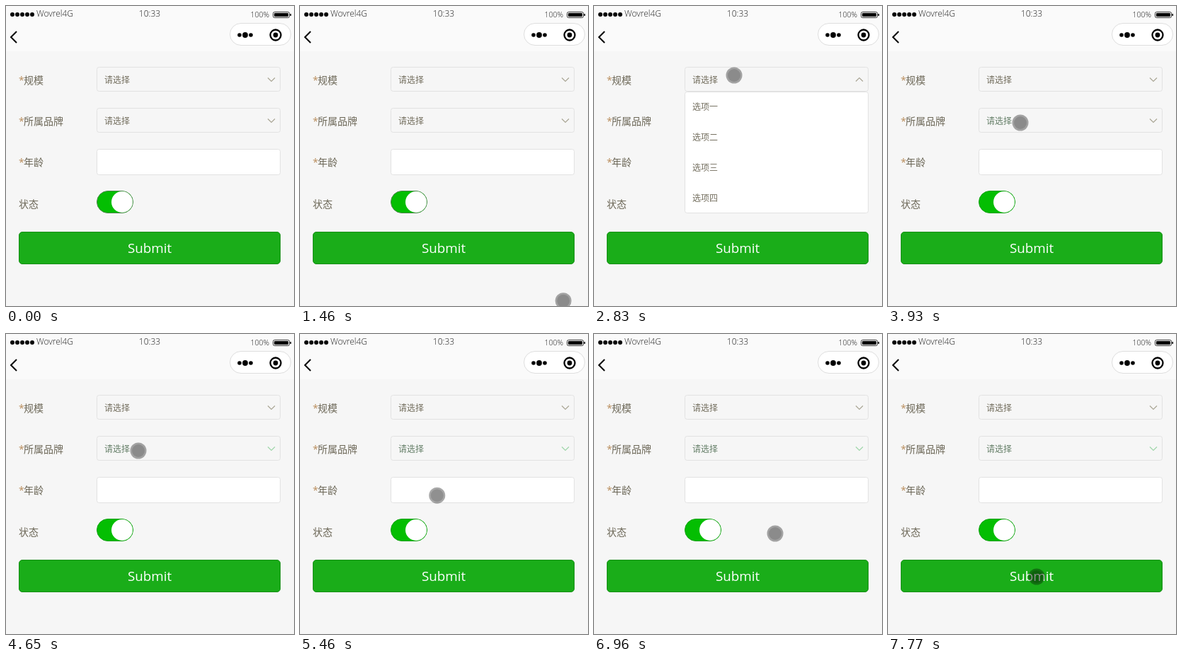
An HTML page for the animation above (8 s loop, 407 by 424 pixels).

```html
<!DOCTYPE html>
<html lang="zh">
<head>
<meta charset="utf-8">
<title>Form</title>
<style>
  html, body { margin: 0; width: 100%; height: 100%; overflow: hidden; background: #f6f6f6; }
  svg { display: block; }
  text { font-family: "Open Sans", "Noto Sans CJK SC", "Noto Sans CJK", sans-serif; }
  .label { font-size: 14px; fill: #6c6757; }
  .star { fill: #b98d5c; }
  .hint { font-size: 12px; fill: #757060; }
  .field { fill: #f6f6f6; stroke: #e2e2e2; }
  .arrow { fill: none; stroke: #aaa695; stroke-width: 1.2; }
  .status { fill: #222; font-weight: 300; }
</style>
</head>
<body>
<svg width="407" height="424" viewBox="0 0 407 424">
  <rect width="407" height="424" fill="#f6f6f6"/>
  <rect width="407" height="64" fill="#fafafa"/>

  <path d="M9 12h28.1" stroke="#000" stroke-width="6" stroke-linecap="round" stroke-dasharray="0 7"/>
  <g class="status">
    <text x="43" y="15" font-size="12">Wovrel4G</text>
    <text x="203" y="15" font-size="12" text-anchor="middle">10:33</text>
    <text x="372" y="16" font-size="10.5" text-anchor="end">100%</text>
  </g>
  <rect x="377.5" y="8.5" width="23" height="8" rx="2" fill="none" stroke="#333"/>
  <rect x="379" y="10" width="20" height="5" rx="1"/>
  <rect x="401.5" y="11" width="1.5" height="3"/>

  <path d="M15 36l-8 8 8 8" fill="none" stroke="#000" stroke-width="2"/>
  <rect x="316.5" y="24.5" width="86" height="31" rx="15.5" fill="#fff" stroke="#dedede"/>
  <circle cx="330" cy="41" r="2.8"/>
  <circle cx="338" cy="41" r="3.9"/>
  <circle cx="346" cy="41" r="2.8"/>
  <circle cx="381" cy="41" r="7.5" fill="none" stroke="#000" stroke-width="2.3"/>
  <circle cx="381" cy="41" r="3.4"/>

  <text class="label" x="18" y="110"><tspan class="star">*</tspan><tspan x="25">规模</tspan></text>
  <text class="label" x="18" y="168"><tspan class="star">*</tspan><tspan x="25">所属品牌</tspan></text>
  <text class="label" x="18" y="226"><tspan class="star">*</tspan><tspan x="25">年龄</tspan></text>
  <text class="label" x="18" y="285">状态</text>

  <g id="selects"></g>

  <rect class="field" x="128.5" y="202.5" width="259" height="36" rx="3" style="fill:#fff"/>
  <path id="caret" d="M139.5 211v18" stroke="#222"/>

  <rect x="128.5" y="261.5" width="51" height="31" rx="15.5" fill="#04be02" id="toggle"/>
  <circle cx="164" cy="277" r="15" fill="#fff"/>

  <rect x="18.5" y="319.5" width="369" height="45" rx="4.5" fill="#1aad19" stroke="#178f17"/>
  <text x="203" y="349" font-size="18.8" fill="#fff" text-anchor="middle">Submit</text>

  <g id="panels"></g>

  <g id="cursor">
    <circle r="11.5" fill-opacity=".34"/>
    <circle r="9" fill-opacity=".14"/>
  </g>
</svg>
<script>
const LOOP = 8000, CLOSE_TIME = 190, ROW = 43;
const byId = id => document.getElementById(id);
const clamp01 = v => Math.max(0, Math.min(1, v));

const selects = [
  { top: 86, open: 2830, close: 3470, rows: 4 },
  { top: 144, open: 4100, close: 4460, rows: 5 },
];

// Each move starts where the previous one ended; px and py are ease-out powers.
const start = { x: 373, y: 418 };
const moves = [
  { from: 1460, to: 2070, x: 198, y: 98, px: 3.05, py: 2.47 },
  { from: 3480, to: 3930, x: 187, y: 165, px: 2, py: 2 },
  { from: 5250, to: 5600, x: 195, y: 240, px: 2, py: 2 },
  { from: 5600, to: 5850, x: 197, y: 225, px: 2, py: 2 },
  { from: 6110, to: 6830, x: 256, y: 282, px: 2, py: 2 },
  { from: 7390, to: 7770, x: 210, y: 343, px: 2, py: 2 },
];

byId('selects').innerHTML = selects.map(({ top }) => `
  <rect class="field" x="128.5" y="${top + .5}" width="259" height="34" rx="3"/>
  <text class="hint" x="139" y="${top + 22.6}">请选择</text>
  <path class="arrow"/>`).join('');

byId('panels').innerHTML = selects.map(({ top, rows }) => {
  const y = top + 35;
  const options = [...'一二三四五'].slice(0, rows).map((n, i) =>
    `<text class="hint" x="139" y="${y + i * ROW + 26}">选项${n}</text>`).join('');
  return `<g><rect x="128.5" y="${y + .5}" width="259" height="${rows * ROW - 1}"
    rx="3" fill="#fff" stroke="#e2e2e2"/>${options}</g>`;
}).join('');

const panels = byId('panels').children;
const arrows = document.querySelectorAll('.arrow');
const hints = document.querySelectorAll('#selects .hint');

function cursorAt(t) {
  let { x, y } = start;
  for (const m of moves) {
    const left = 1 - clamp01((t - m.from) / (m.to - m.from));
    x = m.x + (x - m.x) * left ** m.px;
    y = m.y + (y - m.y) * left ** m.py;
  }
  return { x, y };
}

function draw(t) {
  selects.forEach(({ top, open, close }, i) => {
    const isOpen = t >= open && t < close;
    const opacity = t < open ? 0 : 1 - clamp01((t - close) / CLOSE_TIME);
    panels[i].setAttribute('opacity', opacity);
    arrows[i].setAttribute('d', isOpen
      ? `M370 ${top + 20.5}l5-5 5 5` : `M370 ${top + 15.5}l5 5 5-5`);
  });
  hints[1].style.fill = t < 3470 ? '' : '#67806a';
  arrows[1].style.stroke = t < 4460 ? '' : '#9fd6aa';
  byId('toggle').setAttribute('stroke', t < 3470 ? '#4b854b' : '#10a010');
  byId('caret').setAttribute('opacity', t >= 6050 && t < 6870 ? 1 : 0);

  const { x, y } = cursorAt(t);
  byId('cursor').setAttribute('transform', `translate(${x} ${y})`);
  byId('cursor').setAttribute('opacity', t < 1460 ? 0 : 1);
}

const began = performance.now();
function tick() {
  draw((performance.now() - began) % LOOP);
  requestAnimationFrame(tick);
}
tick();
</script>
</body>
</html>
```
